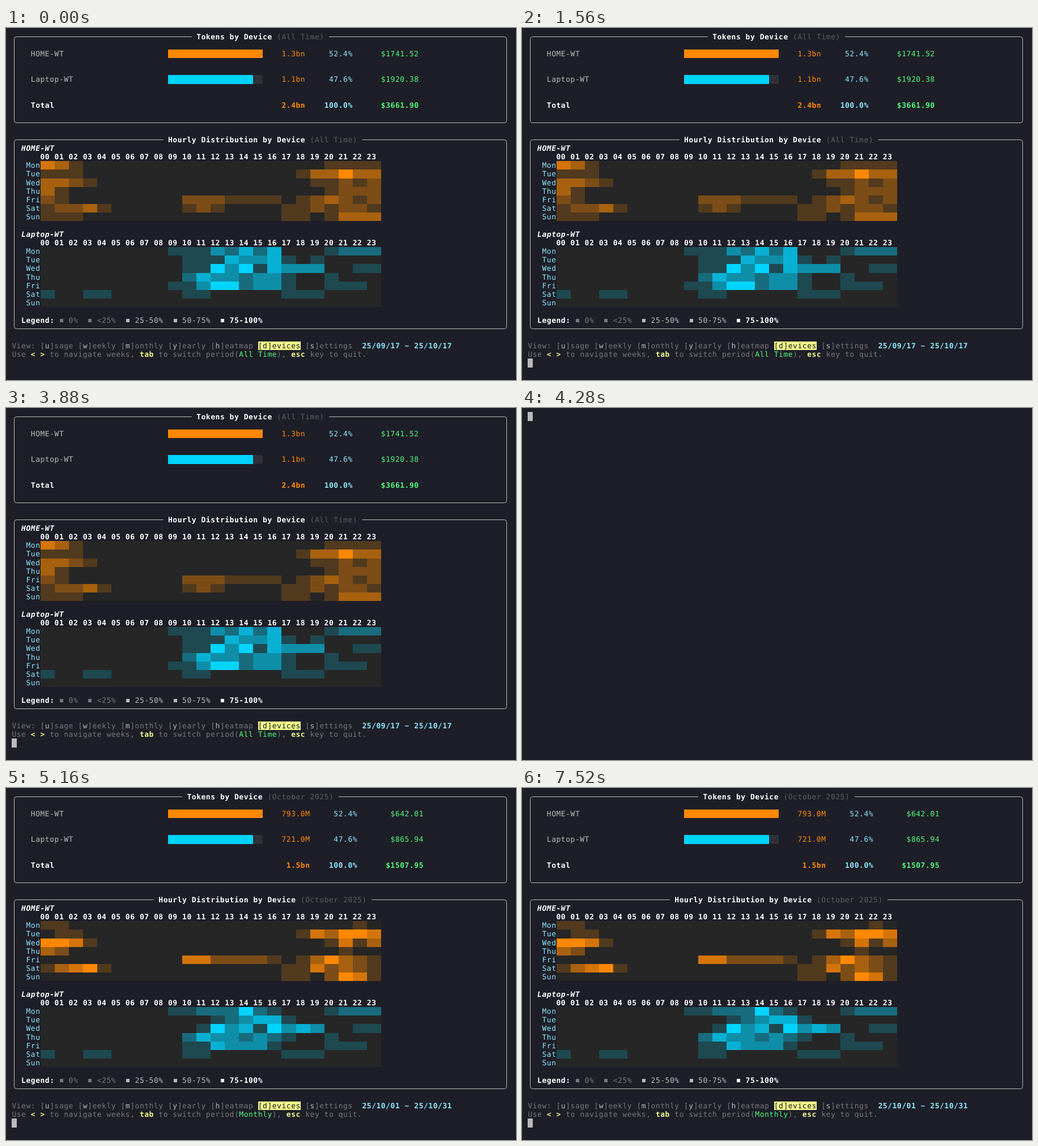
An HTML page for the animation above (8 s loop, 900 by 622 pixels).

```html
<!DOCTYPE html>
<html lang="en">
<head>
<meta charset="utf-8">
<title>Token usage by device</title>
<style>
  html, body { margin: 0; width: 100%; height: 100%; overflow: hidden; background: #1e1e28; }
  svg { display: block; width: 100vw; height: 100vh; }
  text {
    font-family: "DejaVu Sans Mono", monospace;
    font-size: 13px;
    letter-spacing: calc(8.352px - 0.60205em);
    white-space: pre;
    text-rendering: geometricPrecision;
    fill: #bbb;
  }
  rect { shape-rendering: crispEdges; }
  .b { font-weight: bold; }
  .i { font-style: italic; }
  .white { fill: #fff; }
  .dim { fill: #77777b; }
  .faint { fill: #5c5c62; }
  .orange { fill: #ff8800; }
  .cyan { fill: #8be9fd; }
  .green { fill: #50fa7b; }
  .yellow { fill: #f1fa8c; }
  .black { fill: #16161c; }
  .frame { fill: none; stroke: #bbb; stroke-width: 1; }
</style>
</head>
<body>
<svg id="stage" viewBox="0 0 900 622">
  <defs>
    <pattern id="shade" width="3" height="3" patternUnits="userSpaceOnUse">
      <path d="M0 0h.8v.8h-.8zM1.5 1.5h.8v.8h-.8z" fill="#aaa"/>
    </pattern>
  </defs>
</svg>
<script>
const CW = 8.352, CH = 15.185, X0 = 10.4, Y0 = 7.4;
const LOOP = 8000;
const BASE = [38, 38, 38], ORANGE = [255, 136, 0], CYAN = [0, 212, 255];
const DAYS = ["Mon", "Tue", "Wed", "Thu", "Fri", "Sat", "Sun"];
const HOURS = Array.from({ length: 24 }, (_, h) => String(h).padStart(2, "0")).join(" ");
const stage = document.getElementById("stage");

const px = col => X0 + col * CW;
const py = row => Y0 + row * CH;
const snap = v => Math.round(v - 0.2) + 0.5;

function add(parent, tag, attrs, content) {
  const el = document.createElementNS("http://www.w3.org/2000/svg", tag);
  for (const key in attrs) el.setAttribute(key, attrs[key]);
  if (content) el.textContent = content;
  return parent.appendChild(el);
}

// Writes [string, class] parts one after another on the character grid.
function write(g, col, row, ...parts) {
  for (const [str, cls = ""] of parts) {
    add(g, "text", { x: px(col), y: py(row) + 12.1, class: cls }, str);
    col += str.length;
  }
}

function block(g, col, row, cols, fill) {
  return add(g, "rect", { x: px(col), y: py(row), width: cols * CW, height: CH, fill });
}

function panel(g, top, bottom, title, period) {
  const width = title.length + period.length + 5;
  const start = 53 - Math.ceil(width / 2);
  const l = snap(px(0.5)), r = snap(px(104.5));
  const t = snap(py(top + 0.5)), b = snap(py(bottom + 0.5));
  add(g, "path", {
    class: "frame",
    d: `M${px(start)} ${t}H${l + 4}Q${l} ${t} ${l} ${t + 4}V${b - 4}Q${l} ${b} ${l + 4} ${b}` +
       `H${r - 4}Q${r} ${b} ${r} ${b - 4}V${t + 4}Q${r} ${t} ${r - 4} ${t}H${px(start + width)}`
  });
  write(g, start + 1, top, [title, "b white"], [` (${period})`, "faint"]);
}

function tokens(g, view) {
  panel(g, 0, 10, "Tokens by Device", view.period);
  ["HOME-WT", "Laptop-WT", "Total"].forEach((name, i) => {
    const row = 2 + i * 3, bold = i === 2 ? "b " : "";
    const [count, share, cost] = view.rows[i];
    write(g, 4, row, [name, bold && "b white"]);
    write(g, view.ends[0] - count.length, row, [count, bold + "orange"]);
    write(g, view.ends[1] - share.length, row, [share, bold + "cyan"]);
    write(g, view.ends[2] - cost.length, row, [cost, bold + "green"]);
  });
  block(g, 33, 2, 20, `rgb(${ORANGE})`);
  block(g, 33, 5, 18, `rgb(${CYAN})`);
  block(g, 51, 5, 2, "url(#shade)");
}

const mix = (color, level) =>
  `rgb(${BASE.map((v, i) => Math.round(v + (color[i] - v) * level / 5))})`;

// Each day lists its levels; the dot stands for a run of zeros filling 24 hours.
function heatmap(g, row, name, color, data) {
  write(g, 2, row, [name, "b i white"]);
  write(g, 6, row + 1, [HOURS, "b white"]);
  data.split(" ").forEach((line, d) => {
    const y = row + 2 + d;
    const levels = line.replace(".", "0".repeat(25 - line.length));
    write(g, 3, y, [DAYS[d], "cyan"]);
    block(g, 6, y, 72, mix(color, 0));
    [...levels].forEach((n, h) => {
      if (n > 0) block(g, 6 + h * 3, y, 3, mix(color, +n));
    });
  });
}

function legend(g) {
  write(g, 2, 33, ["Legend:", "b white"]);
  const items = [[10, "0%", "dim"], [16, "<25%", "dim"], [24, "25-50%", ""],
                 [34, "50-75%", ""], [44, "75-100%", "b white"]];
  for (const [col, label, cls] of items) {
    const fill = cls === "dim" ? "#77777b" : cls ? "#fff" : "#bbb";
    add(g, "rect", { x: Math.round(px(col + 0.5) - 3), y: 514, width: 6, height: 6, fill });
    write(g, col + 2, 33, [label, cls]);
  }
}

function footer(g, view) {
  block(g, 52, 36, 9, "#f1fa8c");
  const tabs = ["usage", "weekly", "monthly", "yearly", "heatmap", "devices", "settings"];
  const parts = [["View: ", "dim"]];
  for (const tab of tabs) {
    const on = tab === "devices";
    const cls = on ? "black" : "dim";
    parts.push(["[", cls], [tab[0], on ? "black" : ""], ["]" + tab.slice(1), cls], [" "]);
  }
  write(g, 0, 36, ...parts, [" "], [view.range, "b cyan"]);
  write(g, 0, 37, ["Use ", "dim"], ["< >", "b yellow"], [" to navigate weeks, ", "dim"],
    ["tab", "b yellow"], [" to switch period(", "dim"], [view.mode, "green"], ["), ", "dim"],
    ["esc", "b yellow"], [" key to quit.", "dim"]);
}

function hourly(g, view) {
  panel(g, 12, 34, "Hourly Distribution by Device", view.period);
  heatmap(g, 13, "HOME-WT", ORANGE, view.home);
  heatmap(g, 23, "Laptop-WT", CYAN, view.laptop);
  legend(g);
  footer(g, view);
}

const allTime = {
  period: "All Time", mode: "All Time", range: "25/09/17 ~ 25/10/17",
  ends: [62, 72, 86],
  rows: [["1.3bn", "52.4%", "$1741.52"], ["1.1bn", "47.6%", "$1920.38"],
         ["2.4bn", "100.0%", "$3661.90"]],
  home: "431.1111 111.133533 3321.11212 31.1222 21.22211110123212 " +
        "12231.12100001121221 111.1101333",
  laptop: ".111324240001222 .11143341010000 .11535143330011 .24332331001000 " +
          ".113552331001110 10011.11000001110000 ."
};
const october = {
  period: "October 2025", mode: "Monthly", range: "25/10/01 ~ 25/10/31",
  ends: [63, 73, 87],
  rows: [["793.0M", "52.4%", "$642.01"], ["721.0M", "47.6%", "$865.94"],
         ["1.5bn", "100.0%", "$1507.95"]],
  home: "11.10 011.143554 5541.1413 32.100 .44222210135321 13451.1142321 .1102541",
  laptop: ".112225210001222 .123441000000 .1534153430011 .24332321001000 " +
          ".11433310001110 10011.11000001110000 ."
};

const layer = () => add(stage, "g", {});
const before = layer(), afterTop = layer(), afterRest = layer();
tokens(before, allTime);
hourly(before, allTime);
tokens(afterTop, october);
hourly(afterRest, october);
const cursor = block(stage, 0, 38, 1, "#bbb");

const BLINKS = [400, 1000, 1560, 2160, 2720, 3320, 3880, 5760, 6360, 6920, 7520];
const show = (el, on) => el.setAttribute("visibility", on ? "visible" : "hidden");

function draw(t) {
  show(before, t < 4280);
  show(afterTop, t >= 4720);
  show(afterRest, t >= 5160);
  show(cursor, BLINKS.filter(b => b <= t).length % 2);
  const row = t < 4280 || t >= 5160 ? 38 : t < 4720 ? 0 : 12;
  cursor.setAttribute("y", py(row));
}

const begin = performance.now();
function tick() {
  draw((performance.now() - begin) % LOOP);
  requestAnimationFrame(tick);
}
draw(0);
tick();
</script>
</body>
</html>
```
